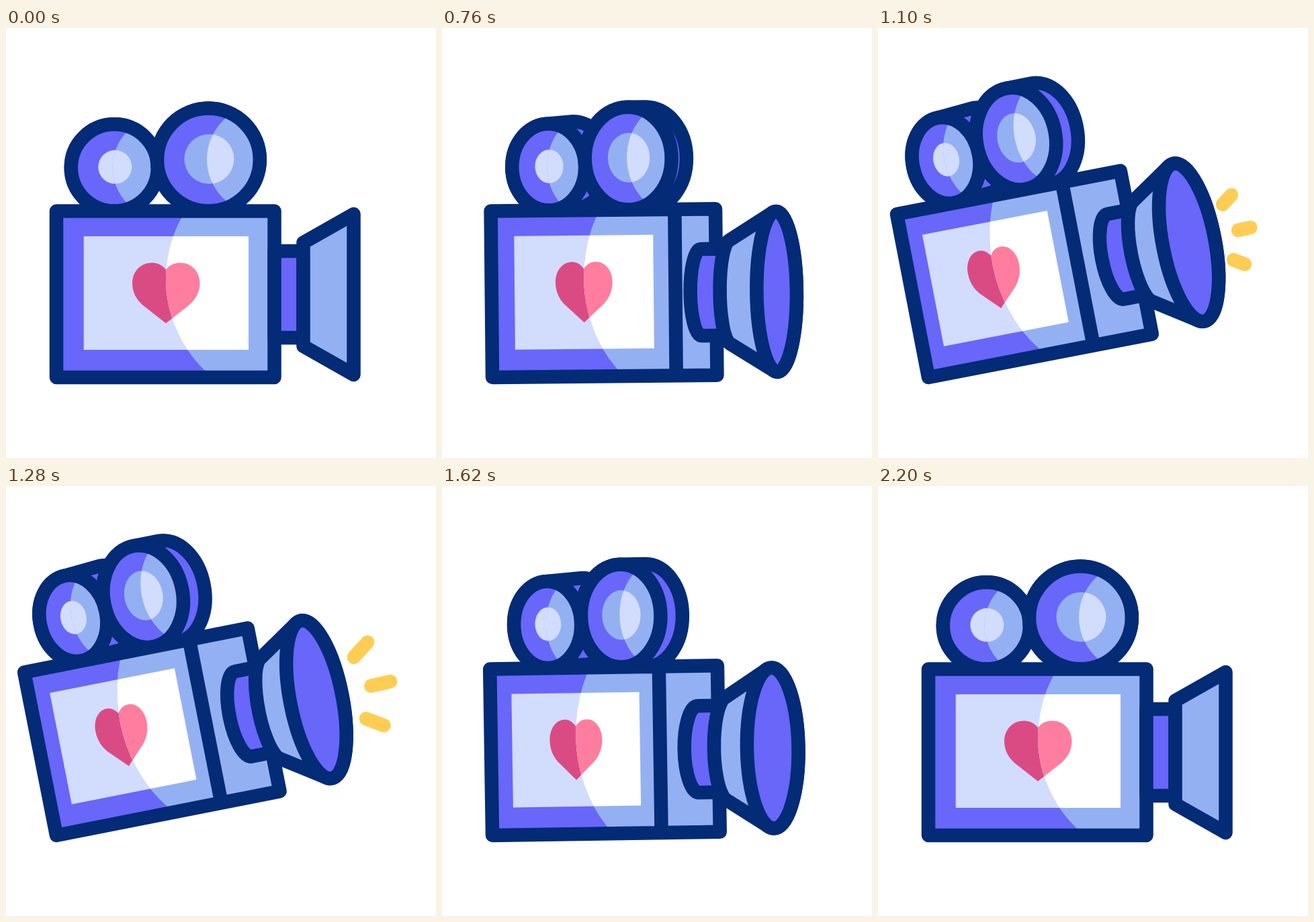
An HTML page with a canvas that plays this animation: 640x640 px, repeating every 2400 ms.

```html
<!DOCTYPE html>
<html lang="en">
<head>
<meta charset="utf-8">
<title>Camera</title>
<style>
  html, body { margin: 0; width: 100%; height: 100%; overflow: hidden; background: #fff; }
  canvas { display: block; width: 640px; height: 640px; }
</style>
</head>
<body>
<canvas id="stage" width="640" height="640"></canvas>
<script>
const c = document.getElementById('stage').getContext('2d');
const NAVY = '#032b76', PURPLE = '#6966fa', BLUE = '#93b1f2', PALE = '#d2dcfc', YELLOW = '#ffcd53';
const LOOP = 2400, MID = 396.5;
const BODY = { left: 75, right: 399.5, top: 272.5, bottom: 520 };
const HEART = new Path2D(
  'M238 359.5C231 351.5 224 349.5 217 349.5C200.5 349.5 188 362.5 188 380C188 393 194 404 203 412' +
  'L238 439.5L273 412C282 404 288.5 393 288.5 380C288.5 362.5 276 349.5 259.5 349.5C252 349.5 245 351.5 238 359.5Z');
const SPARKS = [[553.9, 350.6, 585, 327.5], [569.2, 392.7, 607, 391.5], [554, 434.6, 585, 453.8]];

const mix = (a, b, k) => a + (b - a) * k;

function ease(t, from, to) {
  const p = Math.min(1, Math.max(0, (t - from) / (to - from)));
  return p * p * (3 - 2 * p);
}

function fillRect(color, x1, y1, x2, y2) {
  c.fillStyle = color;
  c.fillRect(x1, y1, x2 - x1, y2 - y1);
}

function disc(color, x, y, r) {
  c.fillStyle = color;
  c.beginPath();
  c.arc(x, y, r, 0, 2 * Math.PI);
  c.fill();
}

function outline(fill) {
  if (fill) {
    c.fillStyle = fill;
    c.fill();
  }
  c.stroke();
}

// Solid between two upright ellipses, a on the left and b on the right, joined by tangents.
function tube(fill, a, b) {
  const slant = Math.asin((b.ry - a.ry) * a.rx / a.ry / (b.x - a.x || 1));
  const end = Math.PI / 2 + slant;
  c.beginPath();
  c.ellipse(a.x, a.y, a.rx, a.ry, 0, end, 2 * Math.PI - end);
  c.ellipse(b.x, b.y, b.rx, b.ry, 0, -end, end);
  c.closePath();
  outline(fill);
}

function ring(fill, e) {
  c.beginPath();
  c.ellipse(e.x, e.y, e.rx, e.ry, 0, 0, 2 * Math.PI);
  outline(fill);
}

// Paints in a horizontally squeezed space, then again in lit colours inside a circle.
function shaded(x, y, squeeze, light, paint) {
  c.save();
  c.translate(x, y);
  c.scale(squeeze, 1);
  paint(false);
  c.beginPath();
  c.arc(light.x, light.y, light.r, 0, 2 * Math.PI);
  c.clip();
  paint(true);
  c.restore();
}

function reel(front, back, squeeze, dot, light) {
  const { x, y, ry } = front;
  tube(PURPLE, front, back);
  shaded(x, y, squeeze, light, lit => {
    disc(lit ? BLUE : PURPLE, 0, 0, ry);
    disc(lit ? PALE : dot.color, 1, -1, dot.r);
  });
  ring(null, front);
}

function reels(u, squeeze) {
  const disk = (x, y, r, k = 1) => ({ x, y, rx: r * squeeze * k, ry: r });
  const thin = 1 - 0.09 * u;
  reel(disk(161.3 + 0.6 * u, 207.8, 64.5), disk(161.3 + 54 * u, 207.8 - 4.3 * u, 64.5),
    squeeze, { color: PALE, r: 25 }, { x: 73.2, y: -0.3, r: 76 });
  reel(disk(301.4 - 30.8 * u, 196, 76.4), disk(301.4 + 7.6 * u, 196, 76.4, thin),
    squeeze, { color: BLUE, r: 37 }, { x: 78.8, y: -0.5, r: 81.2 });
}

function body(u, squeeze) {
  const { left, right, top, bottom } = BODY;
  const far = right + 14.5 * u, edge = mix(left, right, squeeze);
  fillRect(BLUE, left, top, far, bottom);
  shaded(left * (1 - squeeze), 0, squeeze, { x: 428, y: 373.2, r: 190 }, lit => {
    fillRect(lit ? BLUE : PURPLE, left, top, right, bottom);
    fillRect(lit ? '#fff' : PALE, 115.7, 310, 361, 479);
    c.fillStyle = lit ? '#ff7d9e' : '#db4b83';
    c.fill(HEART);
  });
  c.beginPath();
  c.rect(left, top, far - left, bottom - top);
  c.moveTo(edge, top);
  c.lineTo(edge, bottom);
  c.stroke();
}

function lens(v) {
  const disk = (x, ry, round) => ({ x, y: MID, rx: round * v * ry, ry });
  const neck = disk(mix(399.5, 383, v), 64.5, 0.326);
  const back = disk(mix(442.5, 427, v), 77, 0.27);
  const front = disk(mix(517.5, 493.7, v), 119.5, 0.326);
  tube(PURPLE, neck, { ...neck, x: back.x, rx: 0 });
  tube(BLUE, back, front);
  if (v > 0.001) ring(PURPLE, front);
}

function sparks(t) {
  const head = ease(t, 1000, 1200), tail = ease(t, 1200, 1465);
  if (head - tail < 0.005) return;
  c.strokeStyle = YELLOW;
  c.beginPath();
  for (const [x1, y1, x2, y2] of SPARKS) {
    c.moveTo(mix(x1, x2, tail), mix(y1, y2, tail));
    c.lineTo(mix(x1, x2, head), mix(y1, y2, head));
  }
  c.stroke();
}

function draw(now) {
  const t = now % LOOP;
  const back = ease(t, 1570, 2200);
  const u = ease(t, 200, 1095) - back;   // turn of the body
  const v = ease(t, 190, 1023) - back;   // turn of the lens
  const tilt = 12.2 * (ease(t, 695, 1200) - ease(t, 1187, 1705));
  const squeeze = 1 - 0.2287 * u;

  c.clearRect(0, 0, 640, 640);
  c.save();
  c.translate(75, 520);
  c.rotate(-tilt * Math.PI / 180);
  c.translate(-75, -520);
  c.lineWidth = 20.5;
  c.lineJoin = c.lineCap = 'round';
  c.strokeStyle = NAVY;

  reels(u, squeeze);
  body(u, squeeze);
  lens(v);
  sparks(t);
  c.restore();
}

let start;
function tick(now) {
  start ??= now;
  draw(Math.max(0, now - start));
  requestAnimationFrame(tick);
}
draw(0);
requestAnimationFrame(tick);
</script>
</body>
</html>
```
